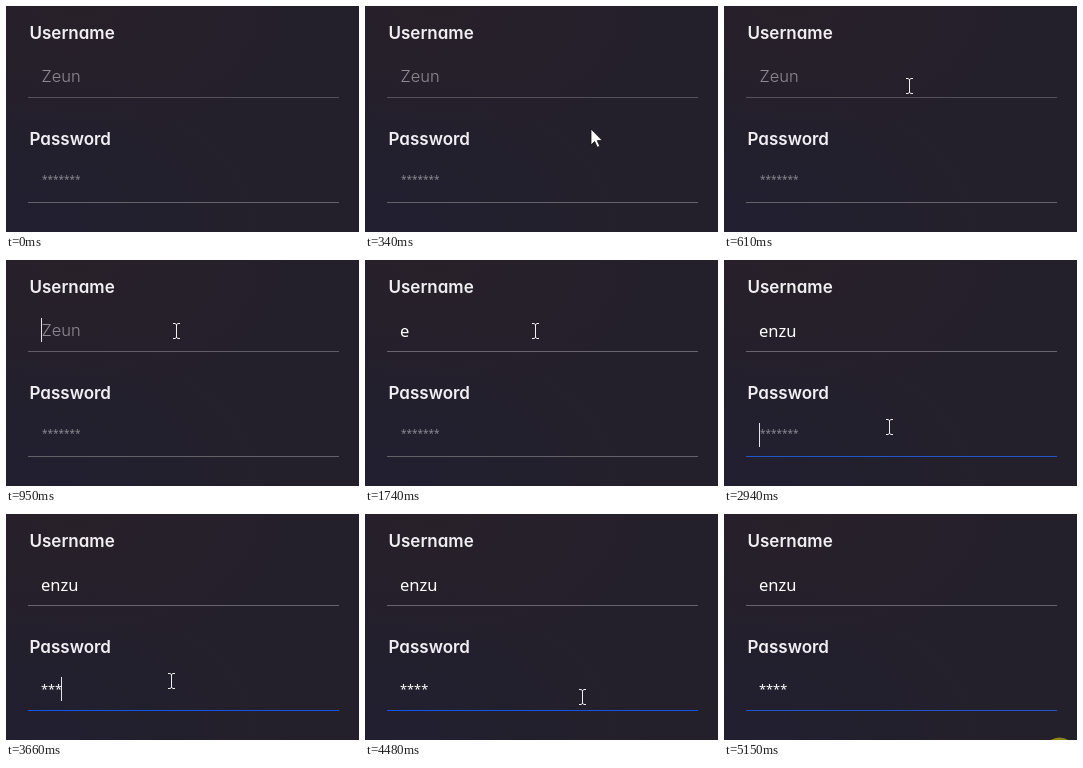
These frames come from a looping animation (353 by 226 pixels, 5180 ms). An HTML page:

```html
<!DOCTYPE html>
<html lang="en">
<head>
<meta charset="utf-8">
<title>Login form</title>
<style>
  html, body { margin: 0; width: 100%; height: 100%; overflow: hidden; background: #24202b; }
  svg { display: block; width: 353px; height: 226px; }
  .label { font: 600 17px Inter, sans-serif; font-feature-settings: "cv11"; fill: #f1eff3; }
  .hint { font: 300 16.5px Inter, sans-serif; font-feature-settings: "cv11"; fill: #8e8b94; }
  .hint.stars { font: 500 10px "Noto Sans", sans-serif; }
  .value { font: 16.5px "Noto Sans", sans-serif; fill: #fff; }
  .value.stars { font-size: 12.8px; font-weight: 500; }
  .crisp { shape-rendering: crispEdges; }
</style>
</head>
<body>
<svg viewBox="0 0 353 226">
  <defs>
    <radialGradient id="warm" cx="0.2" cy="0" r="0.6">
      <stop stop-color="#282029"/>
      <stop offset="1" stop-color="#282029" stop-opacity="0"/>
    </radialGradient>
    <radialGradient id="cool" cx="0.05" cy="1" r="0.75">
      <stop stop-color="#211f30"/>
      <stop offset="1" stop-color="#211f30" stop-opacity="0"/>
    </radialGradient>
  </defs>
  <rect width="353" height="226" fill="#24202b"/>
  <rect width="353" height="226" fill="url(#warm)"/>
  <rect width="353" height="226" fill="url(#cool)"/>

  <text class="label" x="23.5" y="33">Username</text>
  <text class="hint" id="userHint" x="35.5" y="76">Zeun</text>
  <text class="value" id="user" x="35" y="77"></text>
  <rect class="crisp" id="userLine" x="22" y="91" width="311" height="1"/>

  <text class="label" x="23.5" y="139">Password</text>
  <text class="hint stars" id="passHint" x="36" y="177">*******</text>
  <text class="value stars" id="pass" x="35" y="180"></text>
  <rect class="crisp" id="passLine" x="22" y="196" width="311" height="1"/>

  <rect class="crisp" id="caret" width="1" height="24" fill="#e4e3e7"/>
  <g id="pointer">
    <circle id="click" cx="0.5" cy="0.5" r="16" fill="#f4e400" fill-opacity="0.52"/>
    <path id="arrow" d="M0 0V16L3.7 12.5L6.2 18.3L8.8 17.2L6.3 11.6H11.3Z"
          fill="#fff" stroke="#111" stroke-width="0.8"/>
    <path id="beam" d="M-3 -7.5H-1L0.5 -6.5L2 -7.5H4M0.5 -7V7M-3 7.5H-1L0.5 6.5L2 7.5H4"
          fill="none" stroke="#efeff0"/>
  </g>
</svg>
<script>
const LOOP = 5180, BLINK = 490;
const USER_FOCUS = 850, PASS_FOCUS = 2850, BLUR = 5090;
const $ = id => document.getElementById(id);
const show = (id, on) => { $(id).style.display = on ? "" : "none"; };
const ramp = (t, a, b) => Math.min(1, Math.max(0, (t - a) / (b - a)));
const easeOut = k => 1 - (1 - k) ** 2;
const easeIn = k => k ** 1.6;
const smooth = k => k * k * (3 - 2 * k);
const mix = (from, to, k) => `rgb(${from.map((c, i) => Math.round(c + (to[i] - c) * k))})`;

const moves = [
  { from: 130, to: 610, x: 185, y: 80, ease: easeOut },
  { from: 610, to: 790, x: 170, y: 71, ease: smooth },
  { from: 2330, to: 2550, x: 164, y: 125, ease: easeIn },
  { from: 2550, to: 2750, x: 165, y: 167, ease: easeOut },
  { from: 4080, to: 4180, x: 183, y: 167, ease: smooth },
  { from: 4340, to: 4700, x: 335, y: 239, ease: easeIn }
];

function pointerAt(t) {
  let x = 316, y = 218;
  for (const m of moves) {
    const k = m.ease(ramp(t, m.from, m.to));
    x += (m.x - x) * k;
    y += (m.y - y) * k;
  }
  return [Math.round(x), Math.round(y)];
}

// The name is typed ever faster, the password at a steady pace.
const userKey = n => 1210 + 560 * n - 90 * n * (n - 1);
const passKey = n => 3170 + 230 * n;

function type(id, text, keyTime, t) {
  let n = 0;
  while (n < text.length && t >= keyTime(n)) n++;
  $(id).textContent = text.slice(0, n);
  show(id + "Hint", n === 0);
  return n ? keyTime(n - 1) : 0;
}

function drawCaret(t, lastKey) {
  const inPass = t >= PASS_FOCUS;
  const focus = inPass ? PASS_FOCUS : USER_FOCUS;
  const field = $(inPass ? "pass" : "user");
  const width = field.textContent ? field.getComputedTextLength() : 0.5;
  const age = t - Math.max(focus, lastKey);
  $("caret").setAttribute("x", Math.floor(34.5 + width));
  $("caret").setAttribute("y", inPass ? 163 : 58);
  show("caret", t >= focus && t < BLUR && age % (2 * BLINK) < BLINK);
}

function drawPointer(t) {
  const [x, y] = pointerAt(t);
  const overField = (y >= 50 && y < 92) || (y >= 155 && y < 197);
  const clicking = [USER_FOCUS, PASS_FOCUS, LOOP].some(c => t >= c - 60 && t < c + 20);
  $("pointer").setAttribute("transform", `translate(${x} ${y})`);
  show("pointer", t >= 130);
  show("beam", overField);
  show("arrow", !overField);
  show("click", clicking);
}

function draw(t) {
  const userTyped = type("user", "enzu", userKey, t);
  const passTyped = type("pass", "****", passKey, t);
  const focus = ramp(t, PASS_FOCUS, 2970) * (1 - ramp(t, BLUR, 5380));
  $("userLine").setAttribute("fill", mix([84, 81, 88], [103, 100, 108], ramp(t, USER_FOCUS, 1010)));
  $("passLine").setAttribute("fill", mix([100, 97, 105], [17, 82, 232], focus));
  drawCaret(t, Math.max(userTyped, passTyped));
  drawPointer(t);
}

const start = performance.now();
function tick() {
  draw((performance.now() - start) % LOOP);
  requestAnimationFrame(tick);
}
tick();
</script>
</body>
</html>
```
